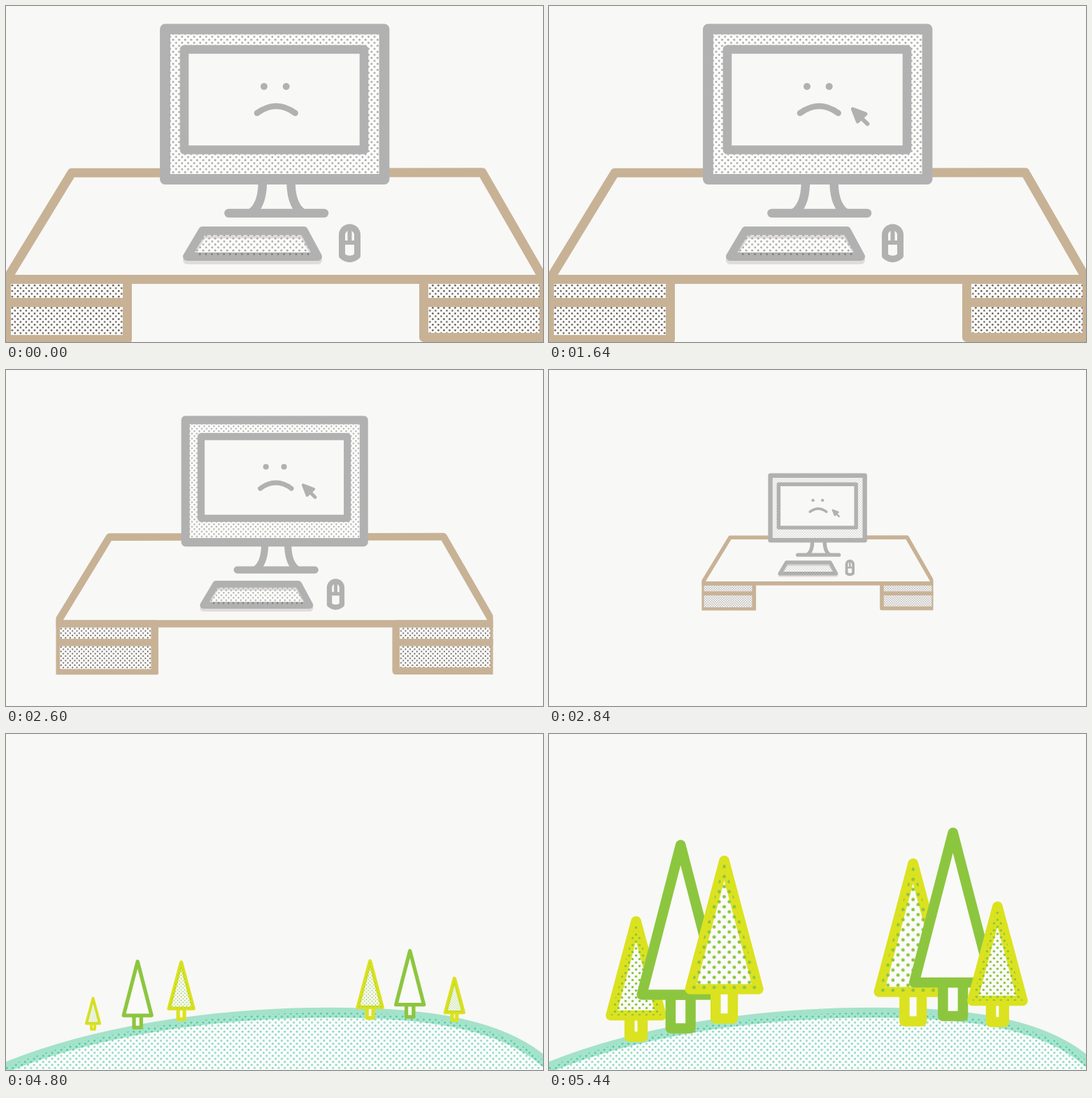
An HTML page that plays this animation: 768x480 px, repeating every 6.76 s.

```html
<!DOCTYPE html>
<html lang="en">
<head>
<meta charset="utf-8">
<title>From desk to forest</title>
<style>
  html, body { margin: 0; width: 100%; height: 100%; overflow: hidden; background: #f8f8f6; }
  svg { display: block; width: 768px; height: 480px; }
  path, rect { stroke-linejoin: round; }
  .grey { fill: none; stroke: #b1b1b1; }
  .tan { fill: none; stroke: #c8b296; stroke-width: 13; }
</style>
</head>
<body>
<svg viewBox="0 0 768 480">
  <defs id="defs">
    <clipPath id="stage"><rect width="768" height="480"/></clipPath>
    <clipPath id="screen"><rect x="261" y="68" width="245" height="131"/></clipPath>
    <path id="hill" d="M-30 489C110 424 300 398 465 398C600 398 730 413 790 489V520H-30Z"/>
  </defs>

  <g id="desk"><g clip-path="url(#stage)">
    <g id="drawers"></g>
    <path class="tan" d="M1 390.5L94 238.3L681 237.7L769 390.5M-9 390.5H777"/>

    <path class="grey" stroke-width="12.5" d="M367 250C367 272 362 288 350 296M407.5 250C407.5 272 412.5 288 424.5 296"/>
    <path class="grey" stroke-width="12.5" stroke-linecap="round" d="M318.5 296H455"/>
    <rect x="227.5" y="33" width="313.5" height="214.5" fill="#fcfcfb"/>
    <rect x="227.5" y="33" width="313.5" height="214.5" fill="url(#greyDots)" stroke="#b1b1b1" stroke-width="14.8"/>
    <rect x="255" y="62" width="257" height="143.5" fill="#f8f8f6" stroke="#b1b1b1" stroke-width="12.6"/>

    <g fill="#b1b1b1"><circle cx="369" cy="115" r="5"/><circle cx="400.7" cy="115" r="5"/></g>
    <path class="grey" stroke-width="8.5" stroke-linecap="round" d="M359 153Q386.5 133 413.7 153"/>
    <path id="click" class="grey" stroke-width="4" stroke-linecap="round" d="M424 151L417 158M425 139L420 135M436 139L440 135"/>
    <g clip-path="url(#screen)">
      <g id="cursor" stroke="#b1b1b1" stroke-linecap="round">
        <path fill="#b1b1b1" stroke-width="5" d="M3 2.7L10 20.8L21.6 9.8Z"/>
        <path stroke-width="6" d="M15 15.3L24 24"/>
      </g>
    </g>

    <path fill="#fcfcfb" stroke="#e0dcda" stroke-width="12" d="M281 326L426 326L446 363L259 363Z"/>
    <path fill="url(#greyDots)" stroke="#b1b1b1" stroke-width="12" d="M281 321L426 321L446 358L259 358Z"/>
    <path fill="none" stroke="#777" stroke-width="2.7" stroke-linecap="round" stroke-dasharray="0 8.6" d="M277.3 354.5H438"/>

    <path class="grey" stroke-width="9" d="M480.5 327a11 11 0 0 1 22 0V357Q491.5 366 480.5 357Z"/>
    <path class="grey" stroke-width="6" d="M483 338H500M491.5 319V337"/>
  </g></g>

  <g id="forest">
    <use href="#hill" fill="#fbfcfb"/>
    <use href="#hill" fill="url(#hillDots)"/>
    <use href="#hill" fill="none" stroke="#a9e9d2" stroke-width="14.5" style="mix-blend-mode:multiply"/>
    <g id="trees"></g>
  </g>
</svg>
<script>
const LOOP = 6760, STEP = 40;
const el = id => document.getElementById(id);

// Staggered dots with one dot at (x, y)
const dots = (id, pitch, r, color, x, y) => `
  <pattern id="${id}" width="${pitch}" height="${pitch}" patternUnits="userSpaceOnUse"
    patternTransform="translate(${x - pitch / 4} ${y - pitch / 4})">
    <g fill="${color}"><circle cx="${pitch / 4}" cy="${pitch / 4}" r="${r}"/>
    <circle cx="${pitch * .75}" cy="${pitch * .75}" r="${r}"/></g>
  </pattern>`;

el('defs').innerHTML +=
  dots('greyDots', 8.6, 1.4, '#a3a3a3', 239, 48.3) +
  dots('darkDots', 8.02, 1.3, '#5c5450', 24.9, 447.3) +
  dots('hillDots', 8.64, 1.45, '#7dd5c0', 632, 477) +
  dots('bigDots', 14.4, 2.4, '#8cc63f', 0, -2.5) +
  dots('smallDots', 10, 1.75, '#8cc63f', 0, -5.5);

const drawer = (x, w, bottom) => {
  const box = `x="${x}" y="390.5" width="${w}" height="${bottom - 390.5}"`;
  return `<rect ${box} fill="#fcfcfb"/><rect ${box} fill="url(#darkDots)"/>
    <rect ${box} class="tan"/><path class="tan" d="M${x} 423.5h${w}"/>`;
};
el('drawers').innerHTML = drawer(.5, 173, 476.5) + drawer(597.5, 172, 473.5);

// Half width, height, trunk half width, trunk depth
const SMALL = { w: 36, h: 134.5, tw: 9.3, td: 30.5, color: '#dbe21f', fill: 'smallDots' };
const TALL = { w: 55.5, h: 214, tw: 14.3, td: 48, color: '#8cc63f' };
const WIDE = { w: 48.8, h: 183.5, tw: 12.3, td: 42, color: '#dbe21f', fill: 'bigDots' };

// Place, base line, height of the point it grows from, start of growth
const trees = [
  [SMALL, 124.5, 402, 417.8, 4565],
  [TALL, 188.2, 372.5, 418.6, 4440],
  [WIDE, 250.6, 364.5, 407.7, 4440],
  [WIDE, 520.7, 368.5, 402.8, 4440],
  [TALL, 577.7, 355, 404.6, 4440],
  [SMALL, 641.4, 381, 407, 4440]
].map(([kind, x, base, root, start]) => ({ ...kind, x, base, root, start }));

el('trees').innerHTML = trees.map(t => {
  const crown = `M0 ${-t.h}L${t.w} 0H${-t.w}Z`;
  return `<g><g fill="#fafaf8" stroke="${t.color}" stroke-width="14.6">
    <rect x="${-t.tw}" width="${2 * t.tw}" height="${t.td}"/>
    <path d="${crown}"/></g>
    ${t.fill ? `<path fill="url(#${t.fill})" d="${crown}"/>` : ''}</g>`;
}).join('');
const treeNodes = [...el('trees').children];

const progress = (t, from, to) => Math.min(1, Math.max(0, (t - from) / (to - from)));

// Slow start, nearly linear end: cubic bezier (1/3, 0, 5/6, 5/6)
function easeIn(x) {
  let lo = 0, hi = 1;
  for (let i = 0; i < 25; i++) {
    const u = (lo + hi) / 2, v = 1 - u;
    if (u * v * v + 2.5 * u * u * v + u ** 3 < x) lo = u; else hi = u;
  }
  return 2.5 * lo * lo * (1 - lo) + lo ** 3;
}
const easeOut = x => 1 - easeIn(1 - x);
const show = (node, on) => node.style.display = on ? '' : 'none';

function draw(now) {
  const t = Math.floor(now % LOOP / STEP) * STEP;

  show(el('desk'), t < 3080);
  const zoom = 1 - easeIn(progress(t, 2360, 3080));
  el('desk').setAttribute('transform', `translate(384 240) scale(${zoom}) translate(-384 -240)`);

  const away = 1 - easeOut(progress(t, 880, 1240));
  show(el('cursor'), t >= 920);
  el('cursor').setAttribute('transform', `translate(${431.4 + 76 * away} ${144.3 + 32 * away})`);
  show(el('click'), t >= 1440 && t < 1640);

  show(el('forest'), t >= 3440);
  trees.forEach((tree, i) => {
    const size = progress(t, tree.start, 5440);
    show(treeNodes[i], size > 0);
    treeNodes[i].setAttribute('transform',
      `translate(${tree.x} ${tree.root}) scale(${size}) translate(0 ${tree.base - tree.root})`);
  });
}

const begin = performance.now();
(function tick() {
  draw(performance.now() - begin);
  requestAnimationFrame(tick);
})();
</script>
</body>
</html>
```
